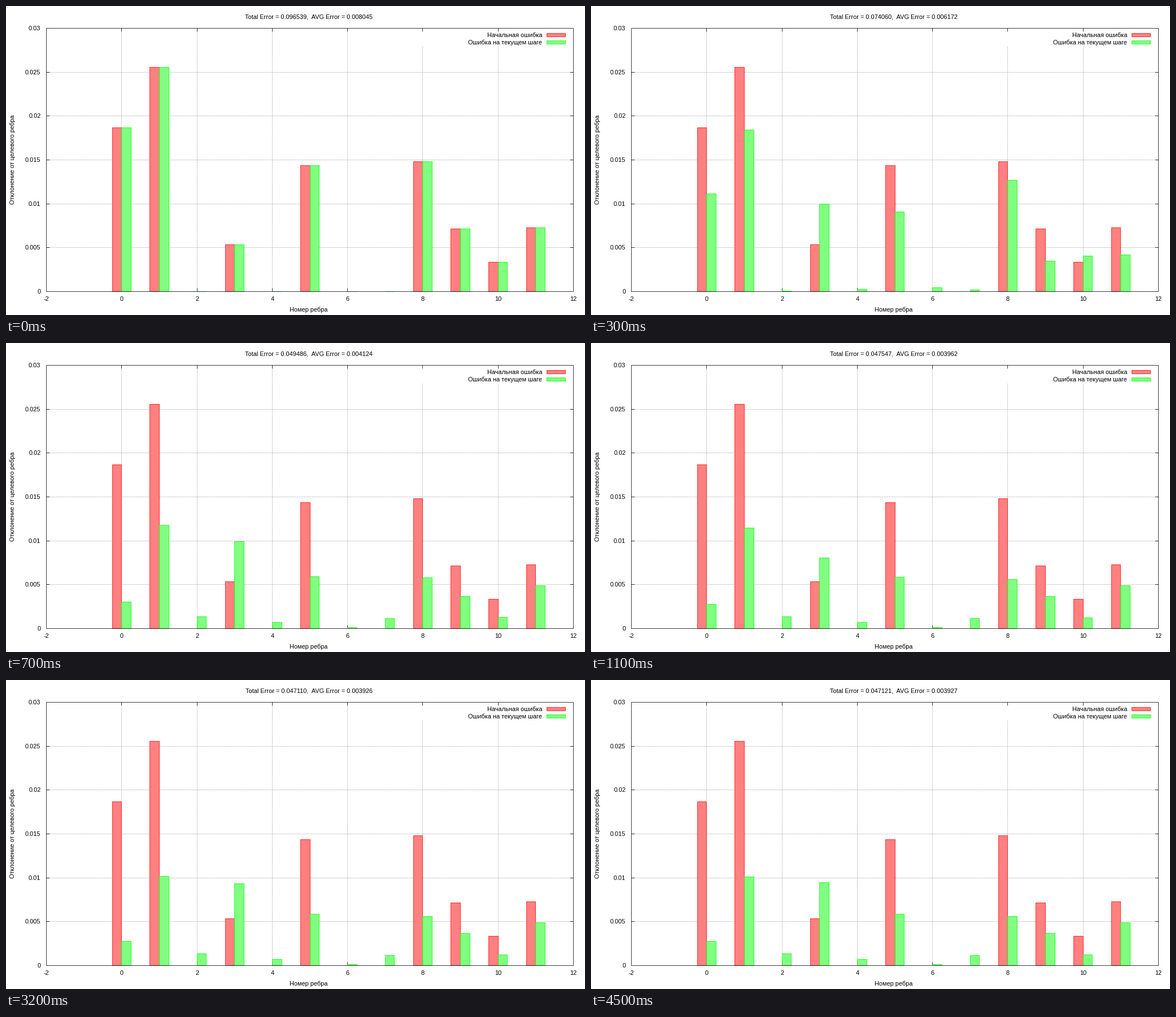
A matplotlib script that plays this animation: 1025x547 px, repeating every 5000 ms.

```python
import matplotlib.pyplot as plt
import numpy as np
from matplotlib.animation import FuncAnimation
from matplotlib.patches import Rectangle

W, H, DPI = 1025, 547, 64
PX = 72 / DPI
LEFT, RIGHT, TOP, BOTTOM = 71, 1004, 39, 505
RED, GREEN = ("#ff8080", "#ff0000"), ("#80ff80", "#00ff00")
LINE = 0.75 * PX
INTERVAL, LOOP = 100, 5000

plt.rcParams.update({
    "font.family": "Liberation Sans",
    "font.size": 11 * PX,
    "path.snap": False,
})

# Moments when the chart is redrawn, in ms
STEPS = [0, 100, *range(300, 1000, 100), *range(1100, 1600, 200),
         1900, 3200, 3400, 3800, 4200, 4500]

# Edge errors in thousandths: at first, after two steps, and at rest
START = np.array([18.65, 25.55, 0, 5.35, 0, 14.35, 0, 0, 14.78, 7.16, 3.37, 7.29])
MID = np.array([11.14, 18.42, 0.05, 9.98, 0.25, 9.08, 0.44, 0.2, 12.69, 3.48, 4.06, 4.19])
REST = np.array([2.75, 10.1, 1.37, 9.45, 0.7, 5.84, 0.14, 1.17, 5.58, 3.67, 1.2, 4.9])

# Total error in millionths at a few steps
TOTAL_STEPS = [0, 2, 4, 9, 12, 13, 17]
TOTALS = [96539, 74060, 50779, 47547, 47148, 47110, 47121]


def settle(t):
    """Relaxation towards REST; edge 3 swings across while edge 1 lags."""
    u = np.clip((t - 500) / 600, 0, 1)
    lag = 1.38 * np.exp(-max(t - 1100, 0) / 750)
    e = REST + 0.05 * (1 - u) * (MID - REST)
    e[1] += lag
    e[3] += lag * (1 - 2 * u)
    return e


def errors(step):
    if step < 2:
        return START + (MID - START) * step / 2
    if step < 4:
        return MID + (settle(500) - MID) * (step - 2) / 2
    return settle(STEPS[step])


def px(x):
    return np.floor(LEFT + (x + 2) * (RIGHT - LEFT) / 14 + 0.5) + 0.5


def py(milli):
    return np.floor(BOTTOM - milli * (BOTTOM - TOP) / 30 + 0.5) + 0.5


fig = plt.figure(figsize=(W / DPI, H / DPI), dpi=DPI, facecolor="white")
ax = fig.add_axes([0, 0, 1, 1])
ax.set_xlim(0, W)
ax.set_ylim(H, 0)
ax.axis("off")


def line(x0, y0, x1, y1, color="black", lw=LINE, z=3, **kw):
    ax.plot([x0, x1], [y0, y1], color=color, lw=lw, zorder=z, **kw)


def box(x0, y0, x1, y1, colors, z=4):
    face, edge = colors
    return ax.add_patch(Rectangle((x0, y0), x1 - x0, y1 - y0, facecolor=face,
                                  edgecolor=edge, lw=LINE, zorder=z))


def label(x, y, text, ha="center", **kw):
    return ax.text(x, y, text, ha=ha, va="baseline", zorder=6, **kw)


L, R, T, B = LEFT + 0.5, RIGHT + 0.5, TOP + 0.5, BOTTOM + 0.5
TICK = 5.5
DOTS = dict(color="#808080", lw=PX, z=1, ls=(0, (1, 2)), dash_capstyle="butt")

for n in range(-2, 13, 2):
    x = px(n)
    label(x, 522, str(n))
    if -2 < n < 12:
        line(x, B, x, T, **DOTS)
        line(x, B, x, B - TICK)
        line(x, T, x, T + TICK)

for m in range(0, 31, 5):
    y = py(m)
    label(61.5, y + 3.5, f"{m / 1000:g}", ha="right")
    if 0 < m < 30:
        line(L, y, R, y, **DOTS)
        line(L, y, L + TICK, y)
        line(R, y, R - TICK, y)

# Legend on a white patch that hides the grid
ax.add_patch(Rectangle((730, 40), 268, 32, color="white", lw=0, zorder=2))
for top, text, colors in ((48, "Начальная ошибка", RED),
                          (61, "Ошибка на текущем шаге", GREEN)):
    label(949, top + 7, text, ha="right")
    box(957.5, top + 0.5, 990.5, top + 6.5, colors)

label(536, 541, "Номер ребра")
label(15, 272, "Отклонение от целевого ребра", rotation=90,
      rotation_mode="anchor")
title = label(536, 23, "")

for i, value in enumerate(START):
    if value:
        box(px(i - 0.25), py(value), px(i), B, RED)
bars = [box(px(i), B, px(i + 0.25), B, GREEN) for i in range(len(START))]
ax.add_patch(Rectangle((L, T), R - L, B - T, fill=False, edgecolor="black",
                       lw=LINE, zorder=5))


def update(frame):
    step = np.searchsorted(STEPS, frame * INTERVAL, side="right") - 1
    for bar, value in zip(bars, errors(step)):
        y = py(value)
        bar.set_y(y)
        bar.set_height(B - y)
    total = np.interp(step, TOTAL_STEPS, TOTALS) / 1e6
    title.set_text(f"Total Error = {total:.6f},  AVG Error = {total / 12:.6f}")
    return [*bars, title]


anim = FuncAnimation(fig, update, frames=LOOP // INTERVAL, interval=INTERVAL,
                     repeat=True, repeat_delay=0, blit=False)
plt.show()
```
